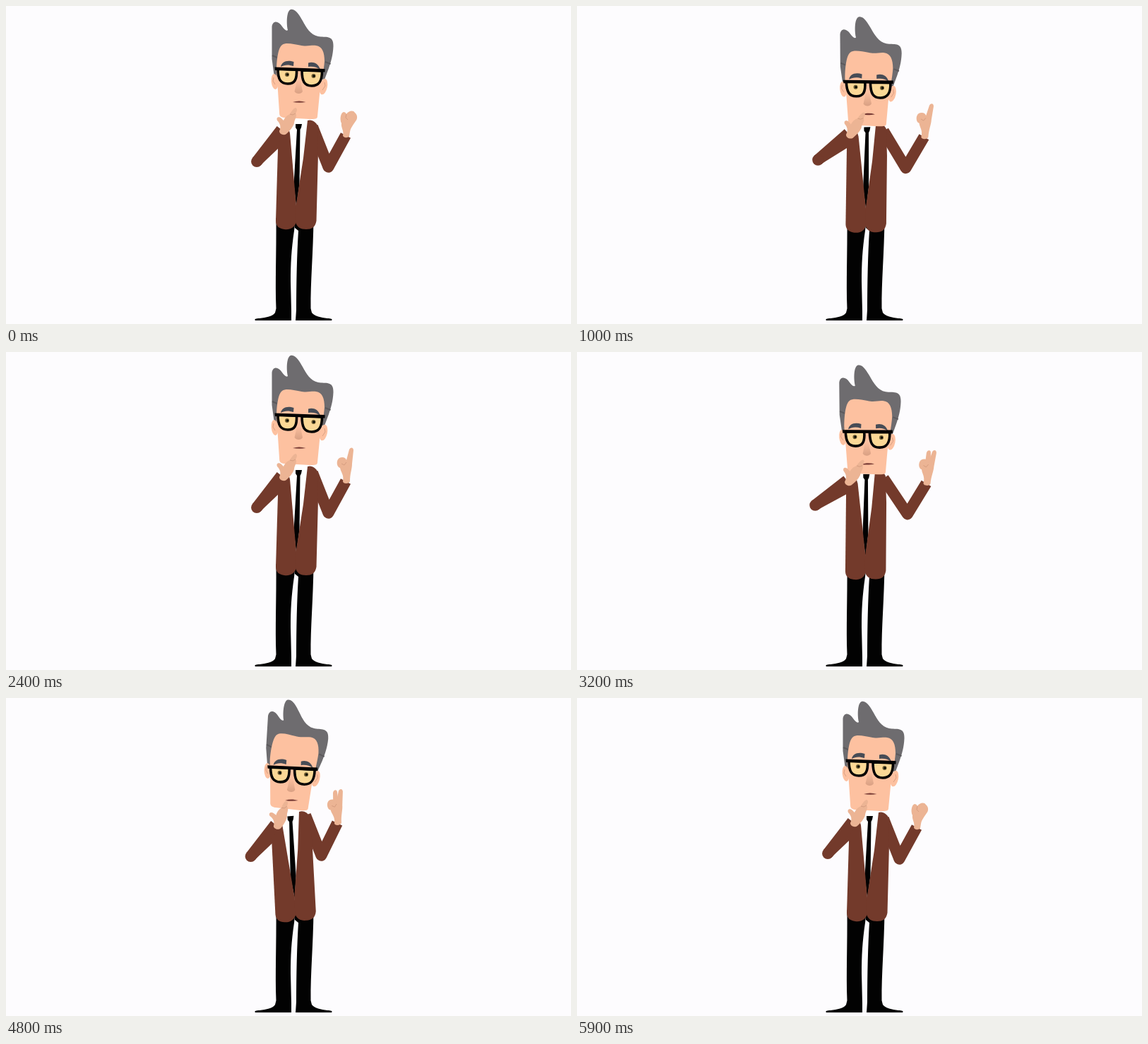
Recreate the animation shown at these times as an HTML page with a canvas. Size 800 by 450 pixels, loop 6000 ms.

```html
<!DOCTYPE html>
<html lang="en">
<head>
<meta charset="utf-8">
<title>Thinking man</title>
<style>
html, body { margin: 0; width: 100%; height: 100%; overflow: hidden; background: #fdfcfe; }
canvas { display: block; width: 800px; height: 450px; }
</style>
</head>
<body>
<canvas id="stage" width="800" height="450"></canvas>
<script>
const ctx = document.getElementById('stage').getContext('2d');
const LOOP = 6000, STEP = 100;

const color = {
  paper: '#fdfcfe', jacket: '#733a2b', black: '#020202', white: '#ffffff',
  hair: '#6e6c6f', streak: '#5b595c', skin: '#fdc1a0', shade: '#d9a083',
  hand: '#ecb494', crease: '#d0977b', brow: '#474c56', lens: '#fbd896',
  iris: '#6a5b31', mouth: '#763a34'
};

const shape = {
  leftLeg: 'M382.5 300H410L408 318C404 345 403 365 403 390L404 432V445H353C351 443 354 442 359 442C368 441 378 439 381 434L382.5 428C381 390 383 350 382.5 300Z',
  rightLeg: 'M408 300H435.5C435 350 431 390 431.5 428L433 434C437 439 446 441 455 442C460 442 463 443 461 445H410L411 430C411 390 412 350 414 318L409 314Z',
  shirt: 'M392 172L404 158H429L425 190L411 285Z',
  leftPanel: 'M385.5 186L398 166L402 180L411 283L411 306C408 314 402 317 394 316C387 315 382 312 382 304Z',
  rightPanel: 'M427 162C433 160 439 164 441.5 170L442 208L439.5 304C438 313 433 316 425 316C417 316 412 313 410 306L410.5 283L421 215Z',
  tie: 'M410 167H419L418 172L416.5 175L415.5 252L411 284L407.5 252L412 175L410 172Z',
  hair: 'M376.5 29C378 20 386 21 391 29C394 33 397 36 399 34C397 25 397 7 403 5C410 3 416 14 420 21C425 30 431 41 442 43C452 45 464 40 463.5 57C463 70 460 79 457 88L451 104L380 101L376.5 75Z',
  face: 'M383 93C383 78 385 59 391 55C396 51 408 54 416 55.5C426 58 432 55 439 56C448 57 451 66 451 78C450 92 446 110 444 125L441 156C441 160 438 160 430 160L393 158C388 157 387 155 387 150L385 120Z',
  leftBrow: 'M389 86C390 79 398 75.5 407.5 79L407 85C400 82.5 394 83 389 86Z',
  rightBrow: 'M428 80.5C434 78.5 442 80 445 90C440 86 434 85 428 86Z',
  nose: 'M412 106H417L420 121C418 125 411 125 408.5 121Z',
  leftLens: 'M385 89L411.5 90C412 104 409 110 399 110C389 110 385 104 385 89Z',
  rightLens: 'M419 91L447.5 92C447.5 107 443 113 433 113C422 113 419 106 419 91Z',
  bar: 'M380.5 86.5L451.5 89V93.5L381 91Z',
  mouth: 'M406 136C412 134 418 134 424.5 136C419 137 412 137 406 136Z',
  chinHand: 'M397 181C393 184 387 181 387 177C390 171 388 166 384 162C382 157 387 156 390 159L393 162C395 157 399 154 402 153C404 149 407 145 410 144C413 145 412 149 410 152C413 156 408 161 408 166C406 172 402 176 397 181Z',
  fist: 'M477 183C479 177 474 172 475 166C472 160 474 151 478 150C481 150 482 153 482 153C485 148 492 147 494 151C498 154 498 160 495 163C492 168 488 172 487 178L486 184C485 187 477 187 477 183Z',
  pointing: 'M477 183C479 174 474 170 473 164C468 163 467 153 472 150C476 148 481 149 482 153L486 138C488 134 492 135 492 139L490 158C490 166 487 172 487 183C486 187 477 187 477 183Z',
  second: 'M477 158L478 140C479 135 484 135 484 139L485 154Z'
};
for (const key in shape) shape[key] = new Path2D(shape[key]);

// Smooth step from 0 at time a to 1 at time b.
function ramp(t, a, b) {
  const k = Math.min(1, Math.max(0, (t - a) / (b - a)));
  return k * k * (3 - 2 * k);
}

// One bow: down, a quick rise past upright, then settling.
const dip = (t, a) =>
  ramp(t, a, a + 450) - 1.2 * ramp(t, a + 450, a + 650) + .2 * ramp(t, a + 650, a + 850);

function motionAt(t) {
  return {
    bow: dip(t, 700) + dip(t, 2800),
    lean: ramp(t, 3350, 3750) - ramp(t, 5000, 5600),
    settle: ramp(t, 3700, 4200) - ramp(t, 5000, 5500),
    nod: ramp(t, 4400, 4800) - ramp(t, 5000, 5500)
      + .3 * (ramp(t, 2500, 2800) - ramp(t, 2800, 3200))
  };
}

function fill(path, style) {
  ctx.fillStyle = style;
  ctx.fill(path);
}

function line(points, width, style, cap = 'butt') {
  ctx.beginPath();
  points.forEach(([x, y]) => ctx.lineTo(x, y));
  ctx.lineWidth = width;
  ctx.lineCap = cap;
  ctx.lineJoin = 'round';
  ctx.strokeStyle = style;
  ctx.stroke();
}

function oval(x, y, rx, ry, style, turn = 0) {
  ctx.beginPath();
  ctx.ellipse(x, y, rx, ry, turn, 0, 7);
  ctx.fillStyle = style;
  ctx.fill();
}

// Moves the pivot to a new place and turns around it.
function group([px, py], [x, y], turn, paint) {
  ctx.save();
  ctx.translate(x, y);
  ctx.rotate(turn);
  ctx.translate(-px, -py);
  paint();
  ctx.restore();
}

// Elbow of a two-bone arm, bent downwards.
function elbowOf([sx, sy], [wx, wy], upper, fore) {
  const dx = wx - sx, dy = wy - sy, d = Math.hypot(dx, dy);
  const bend = Math.acos((upper * upper + d * d - fore * fore) / (2 * upper * d));
  const angle = Math.atan2(dy, dx) + bend;
  return [sx + upper * Math.cos(angle), sy + upper * Math.sin(angle)];
}

function drawTorso() {
  fill(shape.shirt, color.white);
  fill(shape.tie, color.black);
  fill(shape.leftPanel, color.jacket);
  fill(shape.rightPanel, color.jacket);
}

function drawFeatures() {
  fill(shape.leftBrow, color.brow);
  fill(shape.rightBrow, color.brow);
  const fade = ctx.createLinearGradient(0, 104, 0, 124);
  fade.addColorStop(0, color.skin);
  fade.addColorStop(1, color.shade);
  fill(shape.nose, fade);
  for (const lens of [shape.leftLens, shape.rightLens]) {
    fill(lens, color.lens);
    ctx.lineWidth = 3.6;
    ctx.strokeStyle = color.black;
    ctx.stroke(lens);
  }
  fill(shape.bar, color.black);
  for (const [x, y] of [[398, 97], [435.5, 99]]) {
    oval(x, y, 3, 3, color.iris);
    oval(x + .5, y, 1.6, 1.6, color.black);
  }
  fill(shape.mouth, color.mouth);
}

function drawHead(faceY, faceTurn) {
  fill(shape.hair, color.hair);
  line([[377, 70], [384, 73]], 2, color.streak);
  line([[452, 79], [459.5, 82]], 2, color.streak);
  fill(shape.face, color.skin);
  oval(380.5, 107, 4.8, 11, color.skin, -.1);
  oval(449.5, 114, 5.4, 11.5, color.skin, .2);
  line([[379, 101], [378, 106], [381, 111]], .8, color.crease);
  line([[451, 108], [452, 113], [448, 119]], .8, color.crease);
  group([414, 100], [414, 100 + faceY], faceTurn, drawFeatures);
}

function drawRaisedHand(t) {
  if (t < 600 || t >= 5700) {
    fill(shape.fist, color.hand);
    line([[482, 153], [481, 158], [484, 161]], .8, color.crease);
    return;
  }
  if (t >= 2600) fill(shape.second, color.hand);
  fill(shape.pointing, color.hand);
  line([[475, 158], [479, 160], [482, 156]], .8, color.crease);
}

function draw(t) {
  const { bow, lean, settle, nod } = motionAt(t);
  // Each joint drifts by a fixed offset for a full bow and a full lean.
  const joint = ([x, y], [bx, by], [lx, ly]) => [x + bx * bow + lx * lean, y + by * bow + ly * lean];

  ctx.fillStyle = color.paper;
  ctx.fillRect(0, 0, 800, 450);
  fill(shape.leftLeg, color.black);
  fill(shape.rightLeg, color.black);

  const palm = [481, 183];
  const shoulder = joint([434, 171], [0, 8], [-10, -5]);
  const wrist = joint(palm, [14, 3], [-12, -6]);
  const elbow = elbowOf(shoulder, wrist, 61, 51);
  line([shoulder, elbow, wrist], 16, color.jacket);
  group(palm, wrist, .08 * (bow + lean) - .15 * settle, () => drawRaisedHand(t));

  const hip = [410, 312];
  group(hip, joint(hip, [-2, 6], [0, 0]), -.02 * bow - .08 * lean, drawTorso);

  const nose = [414, 120];
  const [headX, headY] = joint(nose, [-4.5, 14], [-8.5, -2]);
  group(nose, [headX - 2.5 * nod * lean, headY], -.01 * bow + .045 * lean + .015 * nod * lean,
    () => drawHead(9.5 * bow + 11 * nod, -.02 * bow - .01 * lean - .04 * nod));

  const chinPalm = [390, 175];
  const [x, y] = joint(chinPalm, [-8, 7], [-8.5, 4]);
  const swing = 2.23 + .26 * bow;
  const chinElbow = [x + 57 * Math.cos(swing), y + 57 * Math.sin(swing)];
  line([chinElbow, [x + 3, y + 9]], 15, color.jacket);
  line([chinElbow, [x, y]], 16, color.jacket);
  oval(...chinElbow, 8, 8, color.jacket);
  group(chinPalm, [x, y], .09 * bow - .15 * lean, () => {
    fill(shape.chinHand, color.hand);
    line([[402, 153], [406, 154], [410, 152]], .8, color.crease);
  });
}

const start = performance.now();
function tick() {
  const t = (performance.now() - start) % LOOP;
  draw(Math.floor(t / STEP) * STEP);
  requestAnimationFrame(tick);
}
tick();
</script>
</body>
</html>
```
